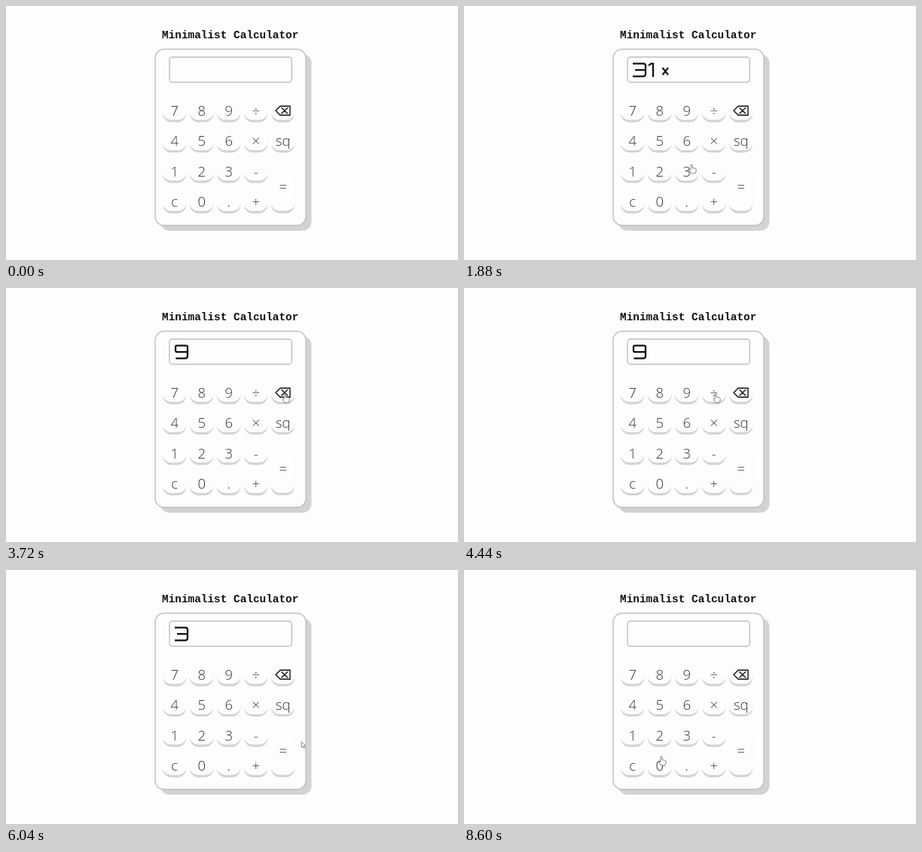
Animation, 600 px wide and 338 px high, one loop 8.64 s. Source, as an HTML page with a canvas:

```html
<!DOCTYPE html>
<html lang="en">
<head>
<meta charset="utf-8">
<title>Minimalist Calculator</title>
<style>
html, body { margin: 0; width: 100%; height: 100%; overflow: hidden; background: #fdfdfd; }
canvas { display: block; }
</style>
</head>
<body>
<canvas id="stage" width="600" height="338"></canvas>
<script>
const ctx = document.getElementById('stage').getContext('2d');
const LOOP = 8640, STEP = 40, PRESS = 80;
const PAPER = '#fdfdfd', SHADE = '#d3d3d4', LINE = '#bfbfbf', INK = '#111';

const keys = {};
['789÷⌫', '456×s', '123-=', 'c0.+'].forEach((row, r) => [...row].forEach((char, c) => {
  const label = char === 's' ? 'sq' : char, tall = char === '=';
  keys[label] = { label, x: 223.7 + 36 * c, y: 139 + 40.4 * (tall ? r + 0.5 : r), half: tall ? 33 : 13 };
}));

// The pointer arrives, rests and leaves; a named key is pressed just before leaving.
const stops = [
  [160, 160, [594, 187]], [680, 960, '3'], [1240, 1360, '1'], [1640, 1720, '×'],
  [1960, 2080, '3'], [2360, 2480, '='], [2640, 2640, [374, 227]], [3360, 3720, '⌫'],
  [3960, 3960, [356, 38]], [4200, 4200, [342, 206]], [4440, 4600, '÷'], [4840, 4960, '3'],
  [5360, 5520, '='], [5720, 6000, [399, 244]], [6320, 6480, 'sq'], [7160, 7160, [371, 181]],
  [8040, 8160, 'c'], [8600, 8640, [262, 248]]
].map(([arrive, leave, target]) => {
  const key = keys[target];
  // The hand stops a little short of the keys away from the middle rows.
  const [x, y] = key ? [key.x + 2.5, key.y + (160 - key.y) * 0.08] : target;
  return { arrive, leave, key, x, y };
});
const presses = stops.filter(s => s.key);

// display glyphs: path and advance
const glyphs = {
  1: ['M0 2.5L3.5 0H6V18', 11],
  3: ['M0 0H14Q17 0 17 3V14Q17 17 14 17H0M3 8.5H17', 21],
  9: ['M17 8.5H3Q1 8.5 1 6.5V2Q1 0 3 0H15Q17 0 17 2V14Q17 17 14 17H1.5', 21],
  '×': ['M7.5 5.5L15 15M15 5.5L7.5 15', 24],
  '÷': ['M7 9.5H19M13 3.5V6M13 13V15.5', 27]
};
for (const glyph of Object.values(glyphs)) glyph[0] = new Path2D(glyph[0]);
const eraser = new Path2D('M0 6L6 0H19V12H6ZM7.5 2L16 10M16 2L7.5 10');
const arrow = new Path2D('M0 0V7.4L1.8 6L3.1 8.6L4.4 8L3.1 5.5H5.4Z');
const hand = new Path2D('M-1 7V1Q-1 0 0 0Q1 0 1 1V4.5L5 5.3Q6 5.6 6 7V9L4.8 12H-.5L-3 8Q-3 6.5-1.7 7Z');

function enter(text, label) {
  if (label === 'c') return '';
  if (label === '⌫') return text.slice(0, -1);
  if (label === 'sq') return String(text ** 2);
  if (label !== '=') return text + label;
  const [, a, op, b] = text.match(/(\d+)(.)(\d+)/);
  return String(op === '×' ? a * b : a / b);
}

function pointerAt(t) {
  const next = stops.findIndex(s => t < s.leave);
  const to = stops[next], from = stops[next - 1] || to;
  if (t >= to.arrive) return to;
  const rest = 1 - (t - from.leave) / (to.arrive - from.leave);
  const ease = 1 - rest * rest;
  return { x: from.x + (to.x - from.x) * ease, y: from.y + (to.y - from.y) * ease };
}

function box(x, y, w, h, radius, fill, stroke) {
  ctx.beginPath();
  ctx.roundRect(x, y, w, h, radius);
  ctx.fillStyle = fill;
  ctx.fill();
  if (stroke) {
    ctx.strokeStyle = stroke;
    ctx.lineWidth = 1.4;
    ctx.stroke();
  }
}

function drawPath(path, x, y, width, color, fill) {
  ctx.save();
  ctx.translate(x, y);
  ctx.lineWidth = width;
  ctx.strokeStyle = color;
  if (fill) {
    ctx.fillStyle = fill;
    ctx.fill(path);
  }
  ctx.stroke(path);
  ctx.restore();
}

function drawKey({ label, x, y, half }, pressed) {
  const top = y - half - 0.5;
  box(x - 15.7, top + (pressed ? 0.8 : 3.2), 31.4, half * 2, 12, SHADE);
  box(x - 16.2, top - 1, 32.4, half * 2 + 1, 12, PAPER);
  if (label === '⌫') {
    drawPath(eraser, x - 9.7, y - 5.7, 1.4, INK);
  } else {
    ctx.fillStyle = '#333';
    ctx.fillText(label, x, y + 7);
  }
}

function drawPointer({ x, y }) {
  const over = Object.values(keys).some(k => Math.abs(x - k.x) < 15.5 && Math.abs(y - k.y) < k.half - 0.5);
  drawPath(over ? hand : arrow, x, y, 0.8, '#666', '#fff');
}

function draw(t) {
  box(0, 0, 600, 338, 0, PAPER);
  ctx.textAlign = 'center';
  ctx.fillStyle = INK;
  ctx.font = 'bold 14.4px "Courier New", "Liberation Mono", monospace';
  ctx.fillText('Minimalist Calculator', 297.7, 43);

  box(205, 64, 200.5, 235, 12, SHADE);
  box(198, 57.5, 200, 234.5, 12, PAPER, LINE);
  box(217, 68, 162.3, 33.5, 4, PAPER, LINE);

  ctx.font = '300 18.5px "Open Sans", sans-serif';
  const active = presses.find(p => t >= p.leave - PRESS && t < p.leave);
  for (const key of Object.values(keys)) drawKey(key, active && active.key === key);

  const text = presses.filter(p => t >= p.leave).reduce((shown, p) => enter(shown, p.key.label), '');
  let x = 224;
  for (const char of text) {
    const [path, advance] = glyphs[char];
    drawPath(path, x, 76.6, 2.3, INK);
    x += advance;
  }
  if (t >= stops[0].arrive) drawPointer(pointerAt(t));
}

const start = performance.now();
function tick() {
  const t = (performance.now() - start) % LOOP;
  draw(Math.floor(t / STEP) * STEP);
  requestAnimationFrame(tick);
}
tick();
</script>
</body>
</html>
```
